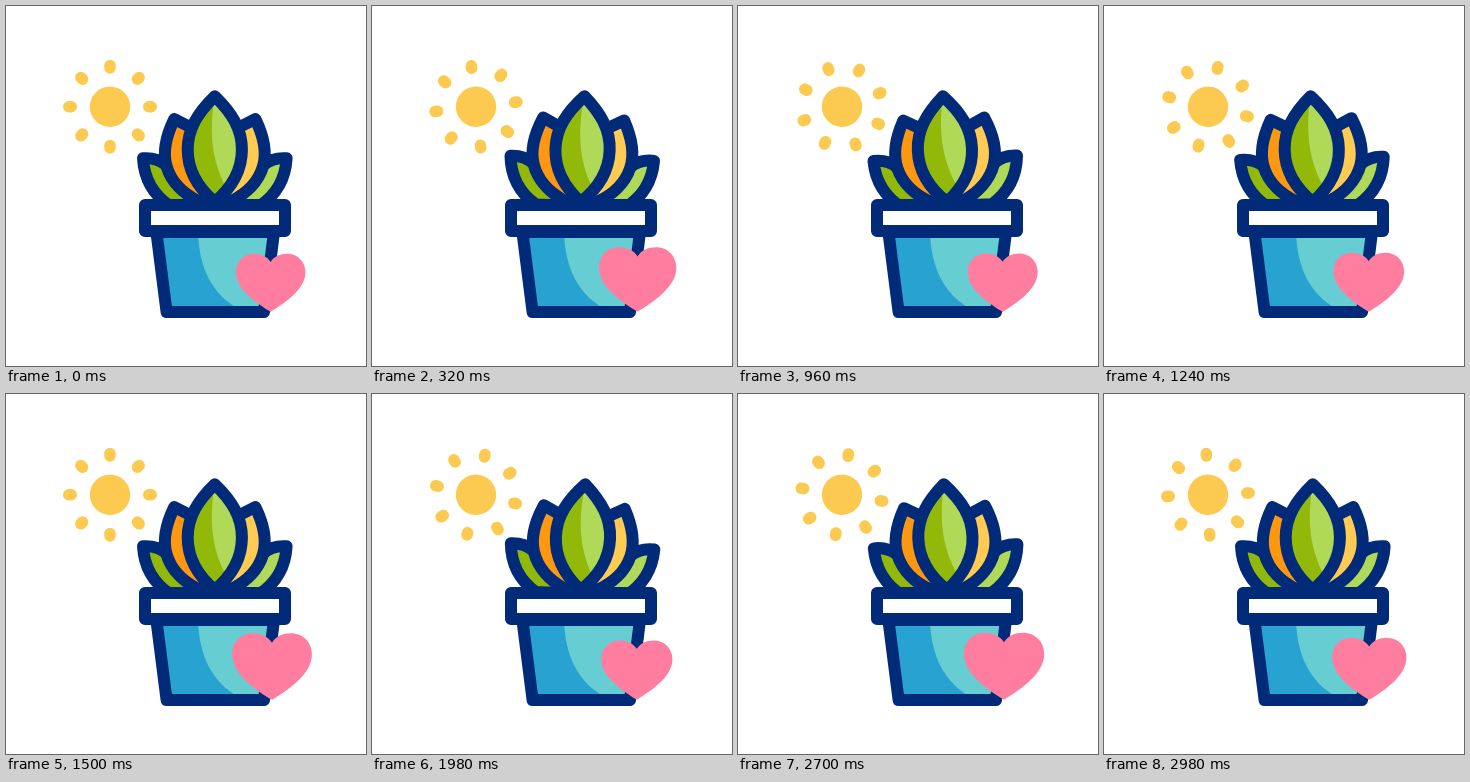
An HTML page with a canvas for the animation above (3 s loop, 360 by 360 pixels).

```html
<!DOCTYPE html>
<html lang="en">
<head>
<meta charset="utf-8">
<title>Potted plant</title>
<style>
  html, body { margin: 0; width: 100%; height: 100%; overflow: hidden; background: #fff; }
  canvas { display: block; width: 360px; height: 360px; }
</style>
</head>
<body>
<canvas id="stage"></canvas>
<script>
const LOOP = 3000, SWAY = 1500, BEAT = 1080;
const NAVY = '#012a78', WHITE = '#fff', PINK = '#ff7d9f', SUN = '#fdca51';
const BLUE = '#28a2d0', TEAL = '#66cdd2', GREEN = '#92b90a', LIME = '#b0d957';
const ORANGE = '#ff9811', YELLOW = '#ffcb52';
const LINE = 12, AXIS = 208.8;

const canvas = document.getElementById('stage');
const dpr = window.devicePixelRatio || 1;
canvas.width = canvas.height = 360 * dpr;
const ctx = canvas.getContext('2d');

const shapes = {
  outer: new Path2D('M137 152.3 C147 151.5 154 154 160 159 L192 200 L164 200 C146 188 138 171 137 152.3 Z'),
  middle: new Path2D('M168.3 113 C161 128 156.5 146 160.5 160 C165 176 178 188 192 195 L209 195 L209 130 L185 121.5 Z'),
  center: new Path2D('M208.8 90.2 C191.5 107 181.7 123 181.7 143.5 C181.7 163 191 181 208.8 196 C226.6 181 235.9 163 235.9 143.5 C235.9 123 226.1 107 208.8 90.2 Z'),
  shade: new Path2D('M209 88 C203 125 204 155 224 189 L209 198 L178 180 L178 100 Z'),
  pot: new Path2D('M150.4 226 L160.6 306 L258 306 L268 226 Z'),
  glow: new Path2D('M192 226 C193 262 206 288 232.5 303 L262 303 L272 226 Z'),
  rim: new Path2D('M139 199 H279 V225 H139 Z'),
  heart: new Path2D('M264.6 305.8 C252 298 229.9 284 229.9 266.2 C229.9 255.5 237.5 247.8 248 247.8 C255 247.8 261 250.5 264.6 256 C268 250.5 274 247.8 281 247.8 C291.5 247.8 299.4 255.5 299.4 266.2 C299.4 284 277 298 264.6 305.8 Z')
};

const ease = x => x < 0.5 ? 4 * x ** 3 : 1 - 4 * (1 - x) ** 3;
const mix = (a, b, x) => a + (b - a) * ease(x);

function fill(path, color) {
  ctx.fillStyle = color;
  ctx.fill(path);
}

function outline(path) {
  ctx.strokeStyle = NAVY;
  ctx.lineWidth = LINE;
  ctx.lineJoin = 'round';
  ctx.stroke(path);
}

function outlined(path, color) {
  fill(path, color);
  outline(path);
}

function twoTone(path, base, part, tone) {
  fill(path, base);
  ctx.save();
  ctx.clip(path);
  fill(part, tone);
  ctx.restore();
  outline(path);
}

function pair(path, left, right) {
  outlined(path, left);
  ctx.save();
  ctx.translate(2 * AXIS, 0);
  ctx.scale(-1, 1);
  outlined(path, right);
  ctx.restore();
}

function drawSun(t) {
  ctx.save();
  ctx.translate(104, 100.7);
  ctx.rotate(t / LOOP * 2 * Math.PI);
  ctx.fillStyle = SUN;
  ctx.beginPath();
  ctx.arc(0, 0, 20.2, 0, 2 * Math.PI);
  ctx.fill();
  for (let i = 0; i < 8; i++) {
    ctx.beginPath();
    ctx.roundRect(-5.75, -47, 11.5, 14, 5.75);
    ctx.fill();
    ctx.rotate(Math.PI / 4);
  }
  ctx.restore();
}

function swayAngle(t) {
  const stops = [0, 2.5, -2.2, 0];
  const p = (t % SWAY) / SWAY * 3;
  const i = Math.floor(p);
  return mix(stops[i], stops[i + 1], p - i) * Math.PI / 180;
}

function drawPlant(t) {
  ctx.save();
  ctx.translate(AXIS, 193);
  ctx.rotate(swayAngle(t));
  ctx.translate(-AXIS, -193);
  pair(shapes.outer, GREEN, LIME);
  pair(shapes.middle, ORANGE, YELLOW);
  twoTone(shapes.center, LIME, shapes.shade, GREEN);
  ctx.restore();
}

function drawPot() {
  twoTone(shapes.pot, BLUE, shapes.glow, TEAL);
  outlined(shapes.rim, WHITE);
}

function drawHeart(t) {
  const p = (t % BEAT) / BEAT * 2;
  const s = mix(1, 1.155, p < 1 ? p : 2 - p);
  ctx.save();
  ctx.translate(255.5, 305.5);
  ctx.scale(s, s);
  ctx.translate(-255.5, -305.5);
  fill(shapes.heart, PINK);
  ctx.restore();
}

function draw(t) {
  ctx.setTransform(dpr, 0, 0, dpr, 0, 0);
  ctx.fillStyle = WHITE;
  ctx.fillRect(0, 0, 360, 360);
  drawSun(t);
  drawPlant(t);
  drawPot();
  drawHeart(t);
}

let start;
function tick(now) {
  start ??= now;
  draw(Math.max(0, now - start) % LOOP);
  requestAnimationFrame(tick);
}
draw(0);
requestAnimationFrame(tick);
</script>
</body>
</html>
```
